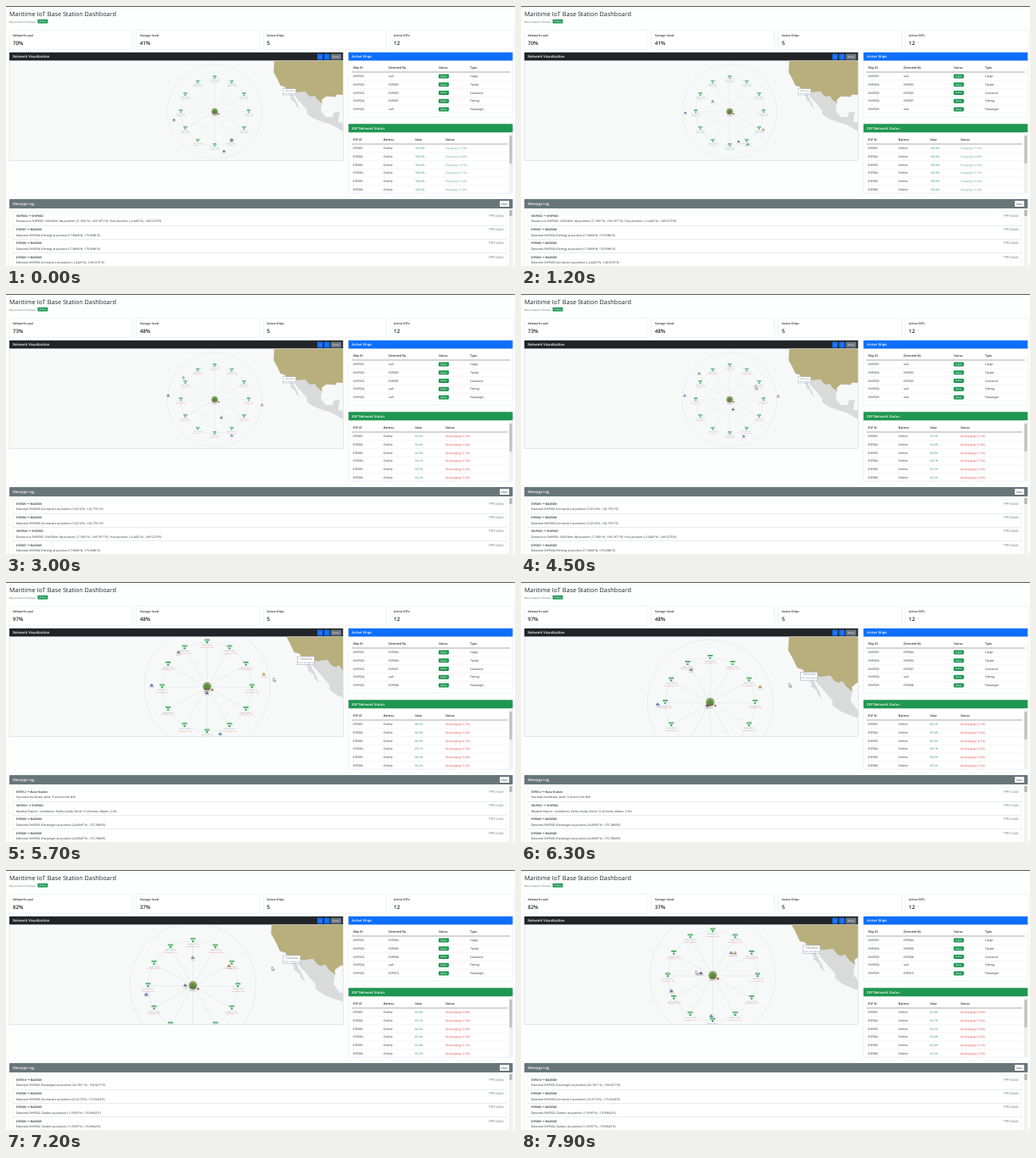
Write an HTML page that moves like this. It is 600x307 px and loops after 8 s.

```html
<!DOCTYPE html>
<html lang="en">
<head>
<meta charset="utf-8">
<title>Maritime dashboard</title>
<style>
html, body { margin: 0; width: 100%; height: 100%; overflow: hidden; background: #fdfefe; }
svg { display: block; width: 100%; height: 100%; }
text {
  font-family: "Open Sans", "Noto Sans CJK TC", "Noto Sans CJK SC", "Noto Sans CJK", sans-serif;
  font-weight: 500;
  text-rendering: geometricPrecision;
}
</style>
</head>
<body>
<svg viewBox="0 0 600 307">
  <defs><clipPath id="view"><rect x="4" y="64.6" width="393.3" height="117.9"/></clipPath></defs>
  <g id="page"></g>
  <g clip-path="url(#view)"><g id="map"></g></g>
  <rect x="4" y="64.6" width="393.3" height="117.9" fill="none" stroke="#d4d9dc" stroke-width=".6"/>
  <g id="data"></g>
  <path id="cursor" d="M0 0V4.6L1.1 3.6 1.9 5.3 2.6 5 1.9 3.4H3.3Z" fill="#fff" stroke="#333" stroke-width=".4"/>
</svg>
<script>
const LOOP = 8000;
const INK = '#1f2429', GREEN = '#1f9651', BLUE = '#0f6ffb', RED = '#e0352f', LINE = '#e3e6e8';
const $ = id => document.getElementById(id);

const text = (x, y, s, size = 3.45, fill = INK, more = '') =>
  `<text x="${x}" y="${y}" font-size="${size}" fill="${fill}" ${more}>${s}</text>`;
const rect = (x, y, w, h, fill, more = '') =>
  `<rect x="${x}" y="${y}" width="${w}" height="${h}" fill="${fill}" ${more}/>`;
const rule = (x1, x2, y, color = LINE, w = .4) =>
  `<path d="M${x1} ${y}H${x2}" stroke="${color}" stroke-width="${w}"/>`;
const card = (x, y, w, h) =>
  rect(x, y, w, h, '#fff', `rx="1" stroke="${LINE}" stroke-width=".5"`);
const BOLD = 'style="font-weight:600"', MID = 'text-anchor="middle"', END = 'text-anchor="end"';
const badge = (x, y, s) =>
  rect(x, y, 12, 4.8, GREEN, 'rx=".8"') + text(x + 6, y + 3.3, s, 2.6, '#fff', `${BOLD} ${MID}`);
const header = (x, y, w, h, fill, s) =>
  rect(x, y, w, h, fill, 'rx=".6"') + text(x + 4, y + h / 2 + 1.6, s, 4.1, '#fff', BOLD);
const button = (x, y, w, fill, s, color = '#fff') =>
  rect(x, y, w, 7, fill, 'rx=".8"') + text(x + w / 2, y + 4.6, s, 3, color, MID);
const columns = (y, cols) =>
  cols.map(([x, name]) => text(x, y, name, 3.5, INK, BOLD)).join('');

// Dashboard readings, each valid from its start time
const detected = (ship, lat, lon) => `Detected ${ship} at position (${lat}°N, ${lon}°E)`;
const BASE = 'BASE001';
const distance = ['SHIP002', 'SHIP003', 'Distance to SHIP003: 168.03km. My position: (7.1601°N, -149.1971°E). Your position: (-2.4425°N, -149.5273°E)'];
const fishing = detected('SHIP004 (Fishing)', '17.9868', '179.9386');
const nearBox = detected('SHIP003 (Container)', '7.6214', '-162.7761');
const liner = detected('SHIP005 (Passenger)', '24.8947', '-175.7884');
const tanker = detected('SHIP002 (Tanker)', '11.9597', '-170.9942');
const STATES = [
  { from: 0, load: 70, storage: 41, clock: '5:00:00', seen: [0, 3, 3, 7, 0], solar: 100, rate: 5, charging: true,
    log: [distance, ['ESP007', BASE, fishing], ['ESP006', BASE, fishing],
      ['ESP003', BASE, detected('SHIP003 (Container)', '-2.4425', '-149.5273')]] },
  { from: 1500, load: 73, storage: 48, clock: '5:00:00', seen: [0, 3, 5, 0, 0], solar: 94.2, rate: 5.6,
    log: [['ESP005', BASE, nearBox], ['ESP004', BASE, nearBox], distance, ['ESP007', BASE, fishing]] },
  { from: 5000, load: 97, storage: 48, clock: '5:10:00', seen: [4, 4, 7, 0, 8], solar: 89.2, rate: 5.2,
    log: [['ESP012', 'Base Station', 'Sea state moderate, wind 15 knots from NW'],
      ['SHIP001', 'SHIP002', 'Weather Report - Conditions: Partly cloudy, Wind: 15-20 knots, Waves: 2-3m'],
      ['ESP009', BASE, liner], ['ESP008', BASE, liner]] },
  { from: 6900, load: 82, storage: 37, clock: '5:00:00', seen: [4, 6, 8, 0, 10], solar: 83.5, rate: 5.5,
    log: [['ESP010', BASE, detected('SHIP005 (Passenger)', '32.7811', '-158.9271')],
      ['ESP008', BASE, detected('SHIP003 (Container)', '23.4173', '-175.5643')],
      ['ESP006', BASE, tanker], ['ESP005', BASE, tanker]] }
];
const wobble = i => Math.sin(i * 1.5 - 1.2) * .7;
const solarOf = (state, i) => state.charging ? '100.0%' : (state.solar + wobble(i)).toFixed(1) + '%';
const rateOf = (state, i) =>
  `${state.charging ? 'Charging (+' : 'Discharging (-'}${(state.rate - wobble(i) * .8).toFixed(1)}%)`;
const espName = n => n ? 'ESP' + String(n).padStart(3, '0') : 'null';
const shipY = i => 84.2 + i * 9.75;
const espY = i => 169.2 + i * 9.7;
const logY = i => 248.9 + i * 16.2;
const cardX = i => 4 + i * 149.7;

function drawPage() {
  let s = rect(0, 0, 600, .8, '#33383b')
    + text(4, 11.9, 'Maritime IoT Base Station Dashboard', 7.25)
    + text(4, 19.5, 'Base Station Status:', 3.4, '#6d757c') + badge(37.3, 15.8, 'Online');
  ['Network Load', 'Storage Used', 'Active Ships', 'Active ESPs'].forEach((name, i) => {
    s += card(cardX(i), 28.5, 145, 22.5) + text(cardX(i) + 4, 36.4, name, 3.5, INK, BOLD);
  });
  s += rect(4, 64.6, 393, 118, '#f7f9f9')
    + header(4, 54.7, 393.3, 10, '#212529', 'Network Visualization')
    + button(367, 56.6, 6.5, BLUE, '+') + button(375, 56.6, 6.5, BLUE, '-')
    + button(382.8, 56.6, 12.6, '#6c757d', 'Reset');

  s += card(403.7, 55, 193.6, 76) + header(403.7, 54.7, 193.6, 9.8, BLUE, 'Active Ships')
    + columns(74.4, [[409, 'Ship ID'], [451, 'Detected By'], [510, 'Status'], [547, 'Type']])
    + rule(407, 594, 78, '#555', .5);
  ['Cargo', 'Tanker', 'Container', 'Fishing', 'Passenger'].forEach((type, i) => {
    const y = shipY(i);
    s += text(409, y, 'SHIP00' + (i + 1)) + badge(510, y - 3.6, 'Active') + text(547, y, type)
      + rule(407, 594, y + 3.7);
  });

  s += card(403.7, 139, 193.6, 82) + header(403.7, 139.2, 193.6, 10, GREEN, 'ESP Network Status')
    + columns(159.2, [[409, 'ESP ID'], [445, 'Battery'], [482, 'Solar'], [518, 'Status']])
    + rule(407, 591, 163, '#555', .5);
  for (let i = 0; i < 6; i++)
    s += text(409, espY(i), espName(i + 1)) + text(445, espY(i), 'Online')
      + (i < 5 ? rule(407, 591, espY(i) + 3.7) : '');
  s += rect(593, 149.2, 4, 71.8, '#f1f1f1') + rect(593.4, 153, 3.2, 33, '#c1c1c1');

  s += card(4, 228, 593, 90) + header(4, 228, 593.3, 11, '#687679', 'Message Log')
    + button(582, 230, 11.2, '#f8f9fa', 'Clear', INK)
    + rect(593, 239, 4, 68, '#f1f1f1') + rect(593.4, 241, 3.2, 7, '#b5b5b5');
  for (let i = 0; i < 5; i++)
    s += rect(8, logY(i) - 5.9, 582, 16.2, 'none', `stroke="${LINE}" stroke-width=".5"`);
  $('page').innerHTML = s;
}

function drawData(state) {
  let s = '';
  [state.load + '%', state.storage + '%', 5, 12].forEach((v, i) =>
    s += text(cardX(i) + 4, 45.9, v, 6.2, INK, BOLD));
  state.seen.forEach((n, i) => s += text(451, shipY(i), espName(n)));
  for (let i = 0; i < 6; i++)
    s += text(482, espY(i), solarOf(state, i), 3.4, GREEN)
      + text(518, espY(i), rateOf(state, i), 3.25, state.charging ? '#4fa974' : RED);
  state.log.forEach(([who, to, message], i) => {
    const y = logY(i);
    s += text(12, y, `${who} → ${to}`, 3.4, INK, BOLD) + text(12, y + 6.5, message, 3.4)
      + text(586.3, y, '下午' + state.clock, 3.3, '#50575d', END);
  });
  $('data').innerHTML = s;
}

// Coasts as longitude,latitude; map units are measured from the base station
const DEGREE = 2.08, HOME = [-157.9, 21.3];
const mercator = lat => Math.log(Math.tan(Math.PI / 4 + lat * Math.PI / 360)) * 180 / Math.PI;
const project = ([lon, lat]) => [(lon - HOME[0]) * DEGREE, (mercator(HOME[1]) - mercator(lat)) * DEGREE];
const land = (coast, look) =>
  `<polygon points="${coast.split(' ').map(p => project(p.split(',').map(Number))).join(' ')}" ${look}/>`;
const BORDER = '-97.1,25.9 -99.5,27.5 -101.4,29.8 -102.9,29.1 -104.5,29.6 -106.5,31.8 -111,31.3 -114.8,32.5 -117.1,32.5';
const US = BORDER + ' -118.4,34 -120.6,34.5 -122.5,37.8 -124.4,40.4 -124,46.2 -124.7,48.4 -122.8,49 -82,49 -82,30 -89,30.2 -89.2,29.1 -94.8,29.3 -97.4,27.5';
const MEXICO = BORDER + ' -115.8,30.3 -114.3,28.2 -115,27.8 -112.2,26 -112,24.6 -109.9,22.9 -111.3,26 -112.8,28.4 -114.7,31.5 -113,31.2 -112.2,29 -109.4,26.2 -105.6,22.2 -105.5,20.2 -102,17.8 -96.5,15.7 -92,14.5 -82,9 -82,15 -88,16 -87,21.4 -90.4,21 -91,18.7 -95,18.5 -97.8,22';
const ISLAND = '-123.3,48.4 -125.2,48.8 -128,50.7 -125,50';

const polar = (i, r) => [r * Math.sin(i * Math.PI / 6), -r * Math.cos(i * Math.PI / 6)];

// Each ship sails a curve: colour, start, bend, end
const SHIPS = [
  ['#77808c', [2, 1], [-86, -52], [19, -20]],
  ['#3c8796', [20, 33], [27, 51], [-2, 35]],
  ['#59507f', [11, 46], [11, 6], [-11, -3]],
  ['#c58a4c', [20, 32], [97, -9], [18, -21]],
  ['#496cab', [-48, 9], [-66, -24], [-36, 14]]
];
const sail = ([, a, b, c], f) =>
  a.map((v, j) => v * (1 - f) ** 2 + 2 * b[j] * f * (1 - f) + c[j] * f * f);

function drawMap(state) {
  let s = land(MEXICO, 'fill="#d9dbdb"') + land(ISLAND, 'fill="#d4d6d6"')
    + land(US, 'fill="#b9af7d" stroke="#a59d72" stroke-width=".3"')
    + '<g fill="none" stroke="#d5dcdc" stroke-width=".35"><circle r="56"/><circle r="40"/>';
  for (let i = 0; i < 12; i++) s += `<path d="M0 0L${polar(i, 40)}"/>`;
  s += '</g>';
  for (let i = 0; i < 12; i++) {
    s += `<g transform="translate(${polar(i, 40)})">` + rect(-2.3, -2.7, 4.6, 1.5, '#45a85c', 'rx=".4"')
      + text(0, -1.5, espName(i + 1), 1.2, '#fff', MID)
      + '<circle cy=".2" r=".9" fill="#35b052"/>'
      + text(0, 3.1, 'Battery: ' + solarOf(state, i), 1.4, '#889', MID)
      + text(0, 5.1, rateOf(state, i), 1.4, state.charging ? '#4caf6c' : '#e0777b', MID) + '</g>';
  }
  s += '<circle cy="-.5" r="3.8" fill="#84a35f"/><path d="M-2.6 1.6V-.8L0-2.8 2.6-.8V1.6Z" fill="#5c8a44"/>'
    + rect(-2.6, 1.6, 5.2, .8, '#6b5a40') + '<circle cx="4.6" cy="2.6" r="1" fill="#b2604c"/>'
    + text(0, 4.8, BASE, 1.5, '#6b5340', MID);
  SHIPS.forEach(([color], i) => {
    s += `<g class="ship"><path d="M-1.8 .3H1.8L1.2 1.4H-1.3Z" fill="${color}"/>`
      + rect(-.9, -1, 1.6, 1.3, color, 'opacity=".75"')
      + text(0, 3.1, 'SHIP00' + (i + 1), 1.3, '#8d7f92', MID) + '</g>';
  });
  s += rect(80.4, -27.2, 15.2, 7.2, '#fff', 'stroke="#98a5b5" stroke-width=".4"')
    + text(88, -24.3, '下午' + state.clock, 2.1, '#555', MID)
    + text(88, -21.3, 'From: Emergency', 1.75, '#5470a8', MID);
  $('map').innerHTML = s;
}

// time, centre x, centre y, zoom: zoom in, drag away, drag back
const VIEW = [[4800, 246, 125, 1], [5200, 237, 124, 1.325], [6000, 237, 124, 1.325],
  [6600, 209, 161, 1.325], [6800, 209, 161, 1.325], [7400, 226, 125, 1.325]];
const POINTER = [[3600, 300, 120], [4400, 276, 108], [5200, 276, 108], [5700, 315, 113],
  [6000, 330, 101], [6600, 302, 138], [6800, 302, 138], [7400, 319, 102], [7900, 206, 119]];

function at(keys, t) {
  const i = keys.findIndex(k => k[0] > t);
  if (i === 0) return keys[0].slice(1);
  if (i < 0) return keys[keys.length - 1].slice(1);
  const a = keys[i - 1], b = keys[i], f = (t - a[0]) / (b[0] - a[0]);
  return a.slice(1).map((v, j) => v + (b[j + 1] - v) * f);
}

let shown;
function frame() {
  const t = performance.now() % LOOP;
  const state = STATES.filter(s => s.from <= t).pop();
  if (state !== shown) {
    drawData(state);
    drawMap(state);
    shown = state;
  }
  const [x, y, zoom] = at(VIEW, t);
  $('map').setAttribute('transform', `translate(${x} ${y}) scale(${zoom})`);
  document.querySelectorAll('.ship').forEach((ship, i) =>
    ship.setAttribute('transform', `translate(${sail(SHIPS[i], t / LOOP)})`));
  $('cursor').setAttribute('transform', `translate(${at(POINTER, t)})`);
  $('cursor').setAttribute('visibility', t < POINTER[0][0] ? 'hidden' : 'visible');
  requestAnimationFrame(frame);
}
drawPage();
frame();
</script>
</body>
</html>
```
